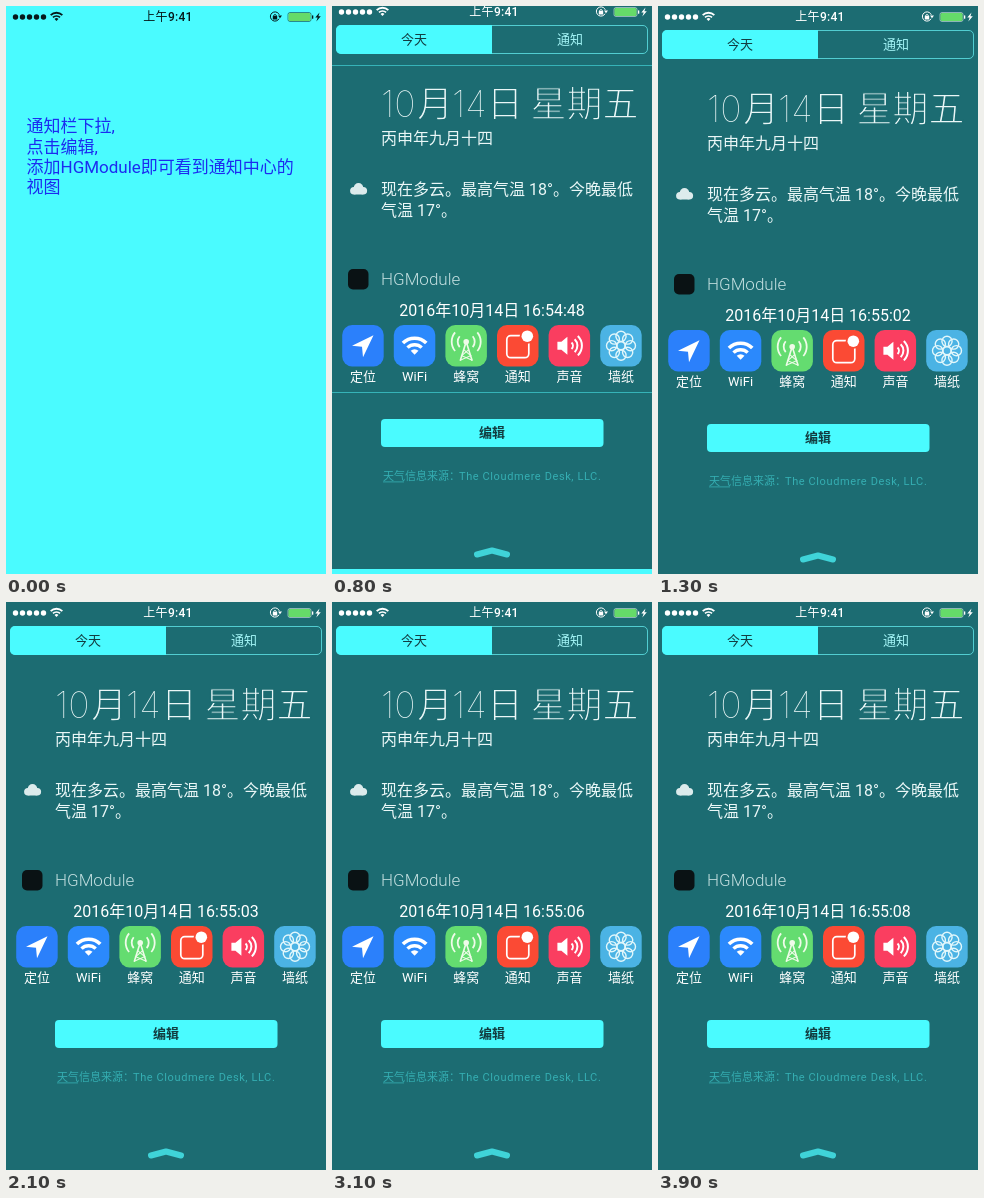
Animation, 320 px wide and 568 px high, one loop 4000 ms. Source, as an HTML page with a canvas:

```html
<!DOCTYPE html>
<html lang="zh-CN">
<head>
<meta charset="utf-8">
<title>Notification centre</title>
<style>
html, body { margin: 0; width: 100%; height: 100%; overflow: hidden; background: #4afbff; }
canvas { display: block; width: 320px; height: 568px; }
</style>
</head>
<body>
<canvas id="stage"></canvas>
<script>
const W = 320, H = 568, LOOP = 4000;
const CYAN = '#4afbff', PANEL = '#1c6c72', PALE = '#eaf7f7', INK = '#123c40';
const FONTS = 'Roboto, "Noto Sans CJK SC", "Noto Sans CJK", sans-serif';
const APP = 'HGModule';

const canvas = document.getElementById('stage');
const ratio = window.devicePixelRatio || 1;
canvas.width = W * ratio;
canvas.height = H * ratio;
const ctx = canvas.getContext('2d');

// y is the visual middle of the line
function text(str, x, y, size, color, { weight = 400, align = 'left', gap = 0, family = FONTS } = {}) {
  ctx.font = `${weight} ${size}px ${family}`;
  ctx.textAlign = align;
  ctx.letterSpacing = gap + 'px';
  ctx.fillStyle = color;
  ctx.fillText(str, x, y + size * 0.36);
}

function box(x, y, w, h, r, color) {
  ctx.beginPath();
  ctx.roundRect(x, y, w, h, r);
  ctx.fillStyle = color;
  ctx.fill();
}

function outline(x, y, w, h, r, color, width) {
  ctx.beginPath();
  ctx.roundRect(x, y, w, h, r);
  ctx.strokeStyle = color;
  ctx.lineWidth = width;
  ctx.stroke();
}

function disc(x, y, r, color) {
  ctx.beginPath();
  ctx.arc(x, y, r, 0, 7);
  ctx.fillStyle = color;
  ctx.fill();
}

function arc(x, y, r, from, to, color, width) {
  ctx.beginPath();
  ctx.arc(x, y, r, from, to);
  ctx.strokeStyle = color;
  ctx.lineWidth = width;
  ctx.stroke();
}

function poly(points, color) {
  ctx.beginPath();
  points.forEach(([x, y]) => ctx.lineTo(x, y));
  ctx.closePath();
  ctx.fillStyle = color;
  ctx.fill();
}

function path(points, color, width) {
  ctx.beginPath();
  points.forEach(([x, y]) => ctx.lineTo(x, y));
  ctx.strokeStyle = color;
  ctx.lineWidth = width;
  ctx.stroke();
}

function rule(y) {
  ctx.fillStyle = '#36b3b8';
  ctx.fillRect(0, y, W, 1);
}

function at(x, y, draw, scale = 1) {
  ctx.save();
  ctx.translate(x, y);
  ctx.scale(scale, scale);
  draw();
  ctx.restore();
}

// Fan of arcs standing on the origin
function wifi(color) {
  const a = -Math.PI * 0.75, b = -Math.PI * 0.25;
  ctx.beginPath();
  ctx.moveTo(0, 0);
  ctx.arc(0, 0, 5.5, a, b);
  ctx.fillStyle = color;
  ctx.fill();
  arc(0, 0, 10, a, b, color, 3.4);
  arc(0, 0, 16.5, a, b, color, 3.6);
}

function statusBar(color) {
  for (let i = 0; i < 5; i++) disc(9.5 + i * 7, 11, 2.7, color);
  at(50.5, 15, () => wifi(color), 0.5);
  text('上午9:41', 162, 11, 12, color, { weight: 500, align: 'center', gap: 0.3 });

  arc(269, 10.5, 4.6, 0.5, 5.9, color, 1);
  poly([[272, 9.5], [276, 9.5], [274, 12.2]], color);
  box(266.8, 10, 4.4, 3.4, 0.5, color);
  arc(269, 10, 1.4, Math.PI, 0, color, 0.9);

  outline(282, 6.5, 23, 9, 2, color, 0.5);
  box(282.5, 7, 22, 8, 1.5, '#65db69');
  box(306, 9.2, 1.3, 3.6, 0.6, color);
  poly([[313.5, 6.5], [309.3, 11.5], [311.7, 11.5], [310.3, 15.5], [314.8, 10.2], [312.4, 10.2]], color);
}

function locationIcon() {
  poly([[10.5, -10.5], [-11, 0], [-1, 1], [0, 11.5]], '#fff');
}

function wifiIcon() {
  at(0, 9, () => wifi('#fff'));
}

function cellIcon() {
  const c = '#effbe9';
  disc(0, -4, 2.8, c);
  path([[-6, 15], [0, -4], [6, 15]], c, 1.6);
  path([[-2.5, 4], [4.5, 10], [-6, 14.5]], c, 1.1);
  path([[2.5, 4], [-4.5, 10], [6, 14.5]], c, 1.1);
  for (const r of [8.5, 14.5]) {
    arc(0, -4, r, -0.7, 0.7, c, 1.8);
    arc(0, -4, r, Math.PI - 0.7, Math.PI + 0.7, c, 1.8);
  }
}

function noticeIcon(back) {
  outline(-11, -10, 22, 22, 4, '#fff', 1.7);
  disc(9.5, -9.5, 7.6, back);
  disc(9.5, -9.5, 5.8, '#fff');
}

function soundIcon() {
  poly([[-12, -4], [-8, -4], [-2, -9], [-2, 9], [-8, 4], [-12, 4]], '#fff');
  for (const r of [4.5, 9, 13.5]) arc(-1, 0, r, -0.8, 0.8, '#fff', 2);
}

function flowerIcon() {
  const c = '#e2f7fb';
  arc(0, 0, 4, 0, 7, c, 1.4);
  for (let i = 0; i < 8; i++) {
    const a = i * Math.PI / 4;
    arc(Math.cos(a) * 9.4, Math.sin(a) * 9.4, 5.1, 0, 7, c, 1.4);
  }
}

const switches = [
  ['定位', '#2b80fb', locationIcon],
  ['WiFi', '#2b89fc', wifiIcon],
  ['蜂窝', '#64dc70', cellIcon],
  ['通知', '#fb4a34', noticeIcon],
  ['声音', '#fa3e60', soundIcon],
  ['墙纸', '#4bb3e4', flowerIcon]
];

function dateTitle() {
  const y = 103.5, size = 36;
  for (const [str, x] of [['10', 49], ['14', 120]]) {
    text(str, x, y, size, PALE, { weight: 100, family: 'Inter, sans-serif' });
  }
  // Thin strokes: fill, then trim the edges with the panel colour
  for (const [str, x] of [['月', 85], ['日', 155], ['星期五', 198.5]]) {
    text(str, x, y, size, PALE);
    ctx.strokeStyle = PANEL;
    ctx.lineWidth = 1.3;
    ctx.strokeText(str, x, y + size * 0.36);
  }
}

function cloud() {
  disc(-4.6, 1.8, 3.8, '#dcebec');
  disc(0, -1.2, 4.8, '#dcebec');
  disc(4.8, 1.8, 3.8, '#dcebec');
  box(-5, 0, 10, 5.6, 1, '#dcebec');
}

function panel(clock) {
  ctx.fillStyle = PANEL;
  ctx.fillRect(0, 0, W, H);
  statusBar('#fff');

  outline(4.5, 24.5, 311, 28, 4.5, '#58d8dc', 0.9);
  box(4, 24, 156, 29, [5, 0, 0, 5], CYAN);
  text('今天', 82, 38.5, 13, INK, { align: 'center' });
  text('通知', 238, 38.5, 13, '#a5f6f8', { align: 'center' });

  dateTitle();
  text('丙申年九月十四', 49, 137, 16, PALE);
  at(26.5, 188, cloud);
  text('现在多云。最高气温 18°。今晚最低', 49, 188, 16, PALE);
  text('气温 17°。', 49, 209, 16, PALE);

  box(16, 268, 20.5, 20.5, 5, '#0a1214');
  text(APP, 49, 278, 17, '#c3dfe0', { weight: 300 });
  text('2016年10月14日 ' + clock, 160, 309, 16, '#fff', { align: 'center' });

  switches.forEach(([label, color, icon], i) => {
    const x = 31 + i * 51.6;
    box(x - 20.8, 324, 41.5, 41.5, 10, color);
    at(x, 344.7, () => icon(color));
    text(label, x, 375.5, 13, '#fff', { align: 'center' });
  });

  box(49, 418, 222.5, 28, 4, CYAN);
  text('编辑', 160, 431.7, 13, INK, { weight: 700, align: 'center' });

  const faint = '#35aeb2';
  text('天气信息来源：', 51, 475, 11, faint);
  ctx.fillRect(51, 480.5, 21, 0.8);
  text('The Cloudmere Desk, LLC.', 127, 475, 11, faint, { gap: 0.6 });

  ctx.lineCap = ctx.lineJoin = 'round';
  path([[145, 553.5], [160, 549.5], [175, 553.5]], '#3fd3d8', 6);
  ctx.lineCap = 'butt';
  ctx.lineJoin = 'miter';
}

function home() {
  const blue = '#1c2cf0';
  statusBar('#06191b');
  ['通知栏下拉,', '点击编辑,', `添加${APP}即可看到通知中心的`, '视图']
    .forEach((line, i) => text(line, 20.5, 120.3 + i * 20.2, 17, blue));
}

// Moments at which the seconds advance, starting with :02
const ticks = [1200, 1800, 2200, 2500, 2800, 3400, 3800];

function clockAt(t) {
  const n = ticks.filter(k => t >= k).length;
  return n ? '16:55:0' + (n + 1) : '16:54:48';
}

const drops = [-218, -5, -1, 0];

function draw(t) {
  ctx.setTransform(ratio, 0, 0, ratio, 0, 0);
  ctx.fillStyle = CYAN;
  ctx.fillRect(0, 0, W, H);
  if (t < 700) return home();

  const step = Math.min(3, Math.floor((t - 700) / 100));
  at(0, drops[step], () => {
    panel(clockAt(t));
    if (step < 2) {
      rule(64);
      rule(391);
    }
    if (step === 0) rule(538);
  });
}

const start = performance.now();
function frame() {
  draw((performance.now() - start) % LOOP);
  requestAnimationFrame(frame);
}
frame();
</script>
</body>
</html>
```
